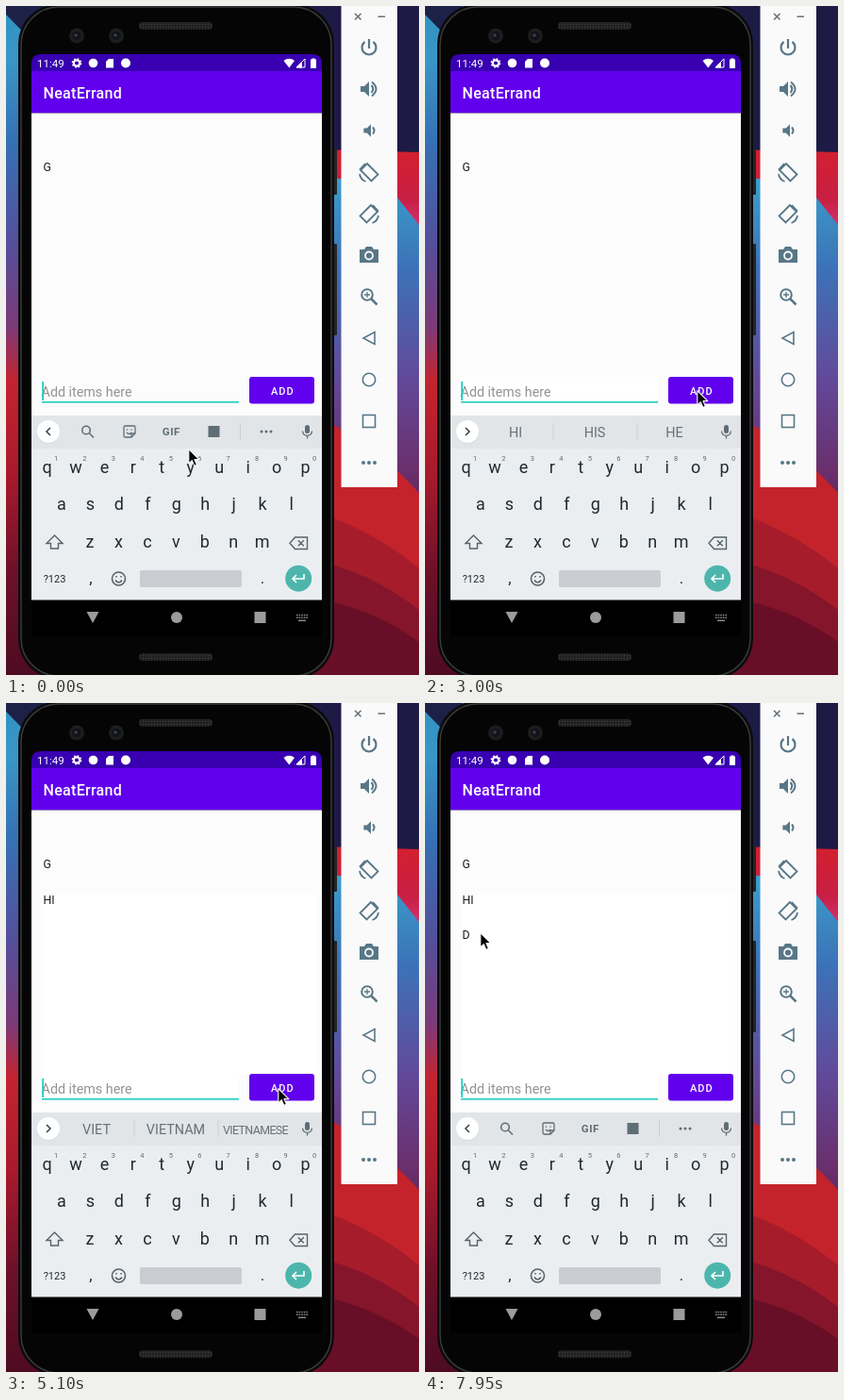
An HTML page for the animation above (8 s loop, 438 px wide and 709 px high).

```html
<!DOCTYPE html>
<html lang="en">
<head>
<meta charset="utf-8">
<title>To-do list demo</title>
<style>
html, body { margin: 0; width: 100%; height: 100%; overflow: hidden; background: #000; }
svg { display: block; width: 100vw; height: 100vh; }
text { font-family: Roboto, Arial, sans-serif; white-space: pre; }
.mid { text-anchor: middle; }
.line { fill: none; stroke-width: 1.6; }
</style>
</head>
<body>
<svg viewBox="0 0 438 709">
  <defs>
    <linearGradient id="left" x2="0" y2="1">
      <stop offset="0" stop-color="#2f93c0"/><stop offset=".08" stop-color="#3a96c6"/>
      <stop offset=".2" stop-color="#3571b5"/><stop offset=".36" stop-color="#554e9a"/>
      <stop offset=".48" stop-color="#7c3a78"/><stop offset=".56" stop-color="#c4232f"/>
      <stop offset=".7" stop-color="#a81a2c"/><stop offset=".85" stop-color="#6d1029"/>
      <stop offset="1" stop-color="#4d0b22"/>
    </linearGradient>
    <linearGradient id="right" x2="0" y2="1">
      <stop offset="0" stop-color="#3aa0cc"/><stop offset=".25" stop-color="#3c72b8"/>
      <stop offset=".55" stop-color="#62499a"/><stop offset=".8" stop-color="#6a2f6c"/>
      <stop offset="1" stop-color="#572050"/>
    </linearGradient>
    <linearGradient id="band" x2="0" y2="1">
      <stop offset="0" stop-color="#d3202e"/><stop offset=".55" stop-color="#c81f45"/>
      <stop offset="1" stop-color="#d8408a"/>
    </linearGradient>
    <pattern id="mesh" width="3" height="3" patternUnits="userSpaceOnUse">
      <rect width="3" height="3" fill="#1c1c1c"/><circle cx="1.5" cy="1.5" r=".9" fill="#3a3a3a"/>
    </pattern>
  </defs>

  <!-- wallpaper -->
  <rect width="200" height="709" fill="url(#left)"/>
  <path d="M0 0H40V50L0 9Z" fill="#1d2148"/>
  <rect x="200" width="238" height="709" fill="#1d1b46"/>
  <path d="M330 152L438 155V250H330Z" fill="url(#band)"/>
  <path d="M330 180Q390 186 415 203L438 232V570H330Z" fill="url(#right)"/>
  <path d="M200 440H340Q395 468 438 516V709H200Z" fill="#c4232b"/>
  <path d="M200 540H340Q395 560 438 596V709H200Z" fill="#a61c2b"/>
  <path d="M200 590H340Q395 606 438 640V709H200Z" fill="#85152a"/>
  <path d="M200 630H340Q395 642 438 674V709H200Z" fill="#680f27"/>

  <!-- phone -->
  <rect x="347" y="152" width="4" height="48" rx="1" fill="#242426"/>
  <rect x="347" y="252" width="4" height="97" rx="1" fill="#242426"/>
  <rect x="13" y="-2" width="335" height="715" rx="42" fill="#0b0b0c"/>
  <rect x="16" y="1" width="329" height="709" rx="40" fill="#050505" stroke="#3c3c3f" stroke-width="1.4"/>
  <rect x="141" y="17" width="78" height="8" rx="4" fill="url(#mesh)"/>
  <rect x="141" y="686" width="78" height="8" rx="4" fill="url(#mesh)"/>
  <g id="lenses"></g>

  <!-- app -->
  <path d="M27 70V61Q27 51 37 51H325Q335 51 335 61V70Z" fill="#3800b0"/>
  <rect x="27" y="69" width="308" height="44.500" fill="#6100ed"/>
  <rect x="27" y="113.500" width="308" height="321" fill="#fcfcfc"/>
  <rect id="listPatch" x="40" y="203" width="289" height="190" fill="#fff"/>
  <rect id="fieldPatch" x="38" y="393" width="209" height="26" fill="#fff"/>
  <g fill="#fff">
    <text x="33" y="65" font-size="11.500">11:49</text>
    <circle cx="75" cy="60.500" r="3.200" fill="none" stroke="#fff" stroke-width="2.200"/>
    <circle cx="75" cy="60.500" r="4.600" fill="none" stroke="#fff" stroke-width="1.500" stroke-dasharray="1.800 1.810"/>
    <circle cx="92.500" cy="60.500" r="4.800"/>
    <path d="M109 56H114V65.500H106V59Z"/>
    <circle cx="127" cy="60.500" r="5"/>
    <path d="M294.500 58Q300.300 53.500 306 58L300.300 65.500Z"/>
    <path d="M308 65L317 56V65Z" fill="none" stroke="#fff" stroke-width="1"/><path d="M308 65.500L314 59.500V65.500Z"/>
    <path d="M323 56.500H324.500V55.500H327.500V56.500H329V66H323Z"/>
    <text x="39.500" y="98" font-size="16" font-weight="500" letter-spacing=".3">NeatErrand</text>
  </g>
  <g id="items" font-size="12.300" fill="#1d1d1d"></g>
  <text id="field" x="37.600" y="413.500" font-size="14.300"></text>
  <path id="under" stroke="#333" stroke-width="1"/>
  <rect x="38" y="419" width="209" height="1.600" fill="#1fcfc0"/>
  <rect id="caret" y="398" width="1.700" height="20" fill="#12cfbf"/>
  <rect id="button" x="258" y="393" width="69" height="28.500" rx="3"/>
  <text class="mid" x="293.300" y="411.500" font-size="11" font-weight="500" letter-spacing="1" fill="#fff">ADD</text>

  <!-- keyboard -->
  <rect x="27" y="434" width="308" height="36" fill="#e1e5e8"/>
  <rect x="27" y="469" width="308" height="161" fill="#ebeef1"/>
  <circle cx="45" cy="451.800" r="12" fill="#cfd4d8"/>
  <circle cx="45" cy="451" r="12" fill="#fff"/>
  <path id="chevron" class="line" stroke="#37474f"/>
  <g id="tools" stroke="#5f6d75" class="line">
    <circle cx="85" cy="449.500" r="4.300"/><path d="M88.300 452.800L93 457.500"/>
    <path d="M126.500 445H135.500Q137 445 137 446.500V453L133 457H126.500Q125 457 125 455.500V446.500Q125 445 126.500 445ZM137 453H133V457M128 452Q130.500 455 133 452M128.500 448.500V449.800M133 448.500V449.800" stroke-width="1.300"/>
    <text class="mid" x="175.300" y="455.300" font-size="11.500" font-weight="700" letter-spacing=".5" fill="#5f6d75" stroke="none">GIF</text>
    <rect x="214.500" y="445" width="12" height="12" fill="#5f6d75" stroke="none"/>
    <path d="M248.500 442V460" stroke="#cbd0d4" stroke-width="1"/>
    <path d="M271 451h.01M276 451h.01M281 451h.01" stroke-width="3" stroke-linecap="round"/>
  </g>
  <g id="words" font-size="14.400" class="mid">
    <path d="M136 442V460M225 442V460" stroke="#cbd0d4"/>
    <text x="96" y="457"></text><text x="180" y="457"></text><text x="264.500" y="457"></text>
  </g>
  <rect x="317" y="444" width="5" height="9" rx="2.500" fill="#5f6d75"/>
  <path d="M314.500 450.500Q315 455.300 319.500 455.300T324.500 450.500M319.500 455.500V458.500" class="line" stroke="#5f6d75" style="stroke-width:1.300"/>
  <g id="keys" class="mid" fill="#1f2a30"></g>
  <g class="line" stroke="#56636a">
    <path d="M51.500 561L60 569.500H55.500V575H47.500V569.500H43Z" stroke-width="1.400"/>
    <path d="M306.500 563H319.500V575.500H306.500L301 569.300ZM309.800 566.300L315.800 572.300M315.800 566.300L309.800 572.300" stroke-width="1.400"/>
    <circle cx="119.500" cy="607" r="7"/><path d="M116 608.500Q119.500 613.500 123 608.500M117 604V605.500M122 604V605.500"/>
  </g>
  <rect x="142" y="598" width="108" height="18" rx="2" fill="#c9ccd0"/>
  <circle cx="310.200" cy="606.700" r="14" fill="#4db6ac"/>
  <path d="M316 602V607H304.500M308 603L304 607L308 611" class="line" stroke="#fff"/>

  <!-- navigation bar -->
  <rect x="27" y="629.500" width="308" height="38" fill="#000"/>
  <g fill="#9b9b9b">
    <path d="M85.500 642H98.500L92 654Z"/><circle cx="181" cy="648" r="6"/><rect x="263.500" y="642" width="12" height="12"/>
    <path d="M308 645.500H320M308 648.200H320" stroke="#8a8a8a" stroke-width="1.500" stroke-dasharray="1.600 1"/><path d="M310 651.300H318" stroke="#8a8a8a" stroke-width="1.500"/>
  </g>

  <!-- side panel -->
  <rect x="355.500" y="-2" width="59.500" height="512" fill="#fafafb"/>
  <g class="line" stroke="#66737a" stroke-width="1.300"><path d="M370 8L376.500 14.500M376.500 8L370 14.500M394.500 11.300H402"/></g>
  <g id="panel" stroke="#587786" fill="none" stroke-width="2"></g>

  <path id="mouse" d="M0 0V15.300L3.500 12L6 17.800L8.600 16.700L6.200 11H11Z" fill="#000" stroke="#fff" stroke-width="1.100" stroke-linejoin="round"/>
</svg>
<script>
const LOOP = 8000, STEP = 150;
const $ = id => document.getElementById(id);
const set = (el, attrs) => { for (const k in attrs) el.setAttribute(k, attrs[k]); };

function add(parent, tag, attrs, text) {
  const el = document.createElementNS('http://www.w3.org/2000/svg', tag);
  set(el, attrs);
  if (text) el.textContent = text;
  return parent.appendChild(el);
}

function buildLenses() {
  for (const x of [75, 117]) {
    add($('lenses'), 'circle', { cx: x, cy: 31.5, r: 8, fill: '#1d1d1f' });
    add($('lenses'), 'circle', { cx: x, cy: 31.5, r: 4.5, fill: '#111318' });
    add($('lenses'), 'circle', { cx: x - 1, cy: 31, r: 1.8, fill: '#38414c' });
  }
}

function buildKeys() {
  const keys = $('keys');
  const row = (letters, x, y) => [...letters].forEach((c, i) =>
    add(keys, 'text', { x: x + i * 30.45, y, 'font-size': 18 }, c));
  row('qwertyuiop', 43.5, 495);
  row('asdfghjkl', 59, 534);
  row('zxcvbnm', 89, 574);
  [...'1234567890'].forEach((c, i) =>
    add(keys, 'text', { x: 53 + i * 30.45, y: 482, 'font-size': 7.5, fill: '#5f6b72' }, c));
  add(keys, 'text', { x: 51.5, y: 611, 'font-size': 11 }, '?123');
  add(keys, 'text', { x: 90, y: 612, 'font-size': 17 }, ',');
  add(keys, 'text', { x: 272, y: 612, 'font-size': 17 }, '.');
}

function buildPanel() {
  const panel = $('panel'), solid = '#587786';
  const icon = (y, d, extra = {}) =>
    add(panel, 'path', { d, transform: `translate(385 ${y})`, ...extra });
  const speaker = 'M-9 -3H-5L0 -8V8L-5 3H-9Z';
  const turn = 'M-2 -9L9.500 2.500L2.500 9.500L-9 -2ZM-10 2Q-9 8 -3.500 10M-10 -2.500L-4 -9';
  icon(44, 'M-4.500 -6A7.500 7.500 0 1 0 4.500 -6M0 -9V1', { 'stroke-width': 2.2 });
  icon(88, speaker, { fill: solid, stroke: 'none' });
  icon(88, 'M2.500 -4Q6 0 2.500 4M3 -7.500Q12 0 3 7.500');
  icon(132, speaker, { fill: solid, stroke: 'none', transform: 'translate(387 132) scale(.85)' });
  icon(132, 'M4 -3.500Q7 0 4 3.500');
  icon(176, turn, { 'stroke-width': 1.8 });
  icon(220, turn, { 'stroke-width': 1.8, transform: 'translate(385 220) scale(-1 1)' });
  icon(264, 'M-10 -6H-5L-3 -9H3L5 -6H10V8H-10Z', { fill: solid, stroke: 'none' });
  add(panel, 'circle', { cx: 385, cy: 264.5, r: 4, stroke: '#fafafb', 'stroke-width': 1.8 });
  add(panel, 'circle', { cx: 383, cy: 306, r: 5.8 });
  icon(308, 'M2.500 2.500L8.500 8.500', { 'stroke-width': 2.5 });
  icon(306, 'M-5 0H1M-2 -3V3', { 'stroke-width': 1.3 });
  icon(352, 'M6 -6.500V6.500L-6 0Z', { 'stroke-width': 1.6 });
  add(panel, 'circle', { cx: 385, cy: 396, r: 6.7, 'stroke-width': 1.6 });
  add(panel, 'rect', { x: 378.5, y: 433.5, width: 13, height: 13, 'stroke-width': 1.6 });
  icon(484, 'M-6 0h.01M0 0h.01M6 0h.01', { 'stroke-width': 4, 'stroke-linecap': 'round' });
}

// Tracks hold each value until the next time.
const typed = [[0, ''], [1800, 'HI'], [3000, ''], [3750, 'V'], [3900, 'VI'], [4050, 'VIE'],
  [4200, 'VIET'], [5100, ''], [5550, 'D'], [6000, '']];
const lists = [[0, 'G'], [3150, 'G HI'], [5250, 'G HI VIET'], [6150, 'G HI VIET D'], [7800, 'G HI D']];
const blink = [[0, 1], [300, 0], [750, 1], [1350, 0], [1800, 1], [2400, 0], [2850, 1], [3600, 0],
  [3750, 1], [4800, 0], [5100, 1], [6450, 0], [7050, 1], [7500, 0], [7950, 1]];
const press = [[0, 0], [2850, 1], [3000, 0], [4950, 1], [5100, 0], [5850, 1], [6000, 0]];
const mouse = [[0, 193, 469], [300, 191, 488], [450, 190, 502], [2100, 222, 482], [2250, 262, 456],
  [2400, 285, 440], [2550, 289, 414], [2700, 288, 407], [3150, 262, 410], [3300, 201, 415],
  [4350, 236, 419], [4500, 268, 421], [4650, 282, 421], [4800, 287, 411], [4950, 288, 408],
  [5400, 287, 414], [5700, 286, 419], [5850, 288, 410], [6150, 238, 399], [6300, 160, 384],
  [6450, 102, 340], [6600, 64, 300], [6750, 46, 290], [6900, 27, 276], [7050, 34, 262],
  [7200, 48, 252], [7350, 58, 243]];
const guesses = {
  HI: ['HI', 'HIS', 'HE'], V: ['V', 'Very', 'Via'], VI: ['VI', 'VIA', 'VIP'],
  VIE: ['VIE', 'VIEW', 'VIET'], VIET: ['VIET', 'VIETNAM', 'VIETNAMESE'], D: ['D', 'Do', 'Did']
};
const at = (track, t) => track.findLast(k => k[0] <= t) || track[0];

function drawStrip(word) {
  $('tools').style.display = word ? 'none' : '';
  $('words').style.display = word ? '' : 'none';
  set($('chevron'), { d: word ? 'M43 447L47 451L43 455' : 'M47 447L43 451L47 455' });
  if (!word) return;
  $('words').querySelectorAll('text').forEach((el, i) => {
    const guess = guesses[word][i], long = guess.length > 8, strong = guess === 'Do';
    el.textContent = guess;
    set(el, {
      'font-size': long ? 12.4 : 14.4, 'letter-spacing': long ? -.6 : 0,
      'font-weight': strong ? 700 : 400, fill: strong ? '#111' : '#667178'
    });
  });
}

function draw(time) {
  const t = Math.floor(time / STEP) * STEP;
  const text = at(typed, t)[1], field = $('field');
  field.textContent = text || 'Add items here';
  set(field, { fill: text ? '#222' : '#929292' });
  const width = text ? field.getComputedTextLength() : 0;
  set($('under'), { d: `M38 414.500H${38 + width}` });
  set($('caret'), { x: 38.3 + width, opacity: at(blink, t)[1] });
  set($('button'), { fill: at(press, t)[1] ? '#8138f1' : '#6100ed' });
  set($('listPatch'), { opacity: +(t >= 3150) });
  set($('fieldPatch'), { opacity: +(t >= 1800) });

  const rows = at(lists, t)[1].split(' ');
  $('items').replaceChildren();
  rows.forEach((row, i) => add($('items'), 'text', { x: 39.5, y: 175 + i * 37.6 }, row));

  // The suggestions linger for one step after the field is cleared.
  drawStrip(text || at(typed, t - STEP)[1]);
  const [, x, y] = at(mouse, t);
  set($('mouse'), { transform: `translate(${x + .8} ${y + .6})` });
}

buildLenses();
buildKeys();
buildPanel();
const start = performance.now();
function tick(now) {
  draw(Math.max(0, now - start) % LOOP);
  requestAnimationFrame(tick);
}
draw(0);
requestAnimationFrame(tick);
</script>
</body>
</html>
```
